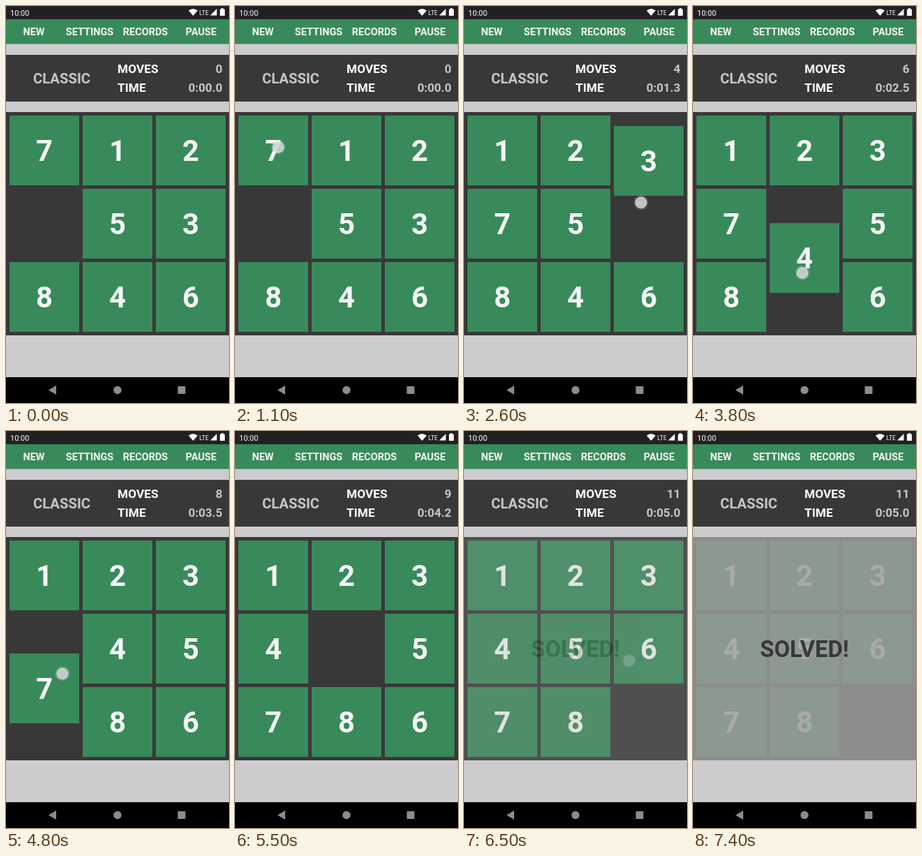
An HTML page that plays this animation: 320 px wide and 569 px high, repeating every 7.5 s.

```html
<!DOCTYPE html>
<html lang="en">
<head>
<meta charset="utf-8">
<title>Sliding puzzle</title>
<style>
  html, body { margin: 0; width: 100%; height: 100%; overflow: hidden; background: #cecbce; }
  svg { display: block; width: 100vw; height: 100vh; font-family: Roboto, sans-serif; font-weight: 700; }
  .mid { text-anchor: middle; }
  .end { text-anchor: end; }
  .menu { font-size: 14.5px; fill: #f4f6f4; }
  .label { font-size: 17.3px; fill: #fff; }
  .value { font-size: 17px; fill: #c8c6c8; }
  .tile rect { fill: #388a5b; }
  .tile text { font-size: 42px; fill: #f5f6f5; }
</style>
</head>
<body>
<svg viewBox="0 0 320 569">
  <defs>
    <radialGradient id="glow">
      <stop offset="0" stop-color="#d8d8d8" stop-opacity=".88"/>
      <stop offset=".58" stop-color="#d2d2d2" stop-opacity=".88"/>
      <stop offset=".68" stop-color="#eee" stop-opacity=".9"/>
      <stop offset=".76" stop-color="#ddd" stop-opacity=".4"/>
      <stop offset="1" stop-color="#ccc" stop-opacity="0"/>
    </radialGradient>
  </defs>

  <rect width="320" height="569" fill="#cecbce"/>

  <!-- status bar -->
  <rect width="320" height="19" fill="#232023"/>
  <g fill="#fff" font-weight="400">
    <text x="6" y="13.5" font-size="11">10:00</text>
    <path d="M262 6.6Q268.5 1.6 275 6.6L268.5 14Z"/>
    <text x="277.5" y="13" font-size="8.4">LTE</text>
    <path d="M293 13.5H302.5V4Z"/>
    <path d="M307 4.5H309V3H312V4.5H314V14H307Z"/>
  </g>

  <!-- menu -->
  <rect y="19" width="320" height="35.5" fill="#388a5b"/>
  <g class="menu mid">
    <text x="40" y="42">NEW</text>
    <text x="120" y="42">SETTINGS</text>
    <text x="200" y="42">RECORDS</text>
    <text x="280" y="42">PAUSE</text>
  </g>

  <!-- score panel -->
  <rect y="70" width="320" height="67" fill="#393839"/>
  <text class="mid" x="80" y="111" font-size="20.3" fill="#c8c6c8">CLASSIC</text>
  <text class="label" x="160" y="96">MOVES</text>
  <text class="label" x="160" y="123">TIME</text>
  <text class="value end" id="moves" x="310.5" y="96">0</text>
  <text class="value end" id="time" x="310.5" y="123">0:00.0</text>

  <!-- board -->
  <rect y="152" width="320" height="320" fill="#393839"/>
  <g id="tiles"></g>
  <g id="solved" opacity="0">
    <rect y="152" width="320" height="320" fill="#9d9d9b" fill-opacity=".84"/>
    <text class="mid" x="160" y="324" font-size="32.8" fill="#393739">SOLVED!</text>
  </g>
  <circle id="dot" r="11" fill="url(#glow)"/>

  <!-- navigation bar -->
  <rect y="532" width="320" height="37" fill="#000"/>
  <g fill="#8c8c8c">
    <path d="M61 550.5L72 544V557Z"/>
    <circle cx="160" cy="550.5" r="5.7"/>
    <rect x="246.5" y="545" width="11" height="11" rx="1"/>
  </g>
</svg>
<script>
  const LOOP = 7500, STEP = 105, SLIDE = 150, SWIPE_SPEED = 0.25, CLOCK_RATE = 0.98;
  const START = [7, 1, 2, 0, 5, 3, 8, 4, 6];
  const DIRS = { L: [-1, 0], R: [1, 0], U: [0, -1], D: [0, 1] };
  // start time, tile, direction, finger position when the tile is released
  const MOVES = [
    [1180, 7, 'D', 62, 222], [1677, 1, 'L', 175, 212], [2085, 2, 'L', 270, 214],
    [2488, 3, 'U', 254, 310], [3210, 5, 'R', 165, 314], [3723, 4, 'U', 157, 402],
    [4222, 8, 'R', 66, 412], [4722, 7, 'D', 81, 328], [5220, 4, 'L', 150, 314],
    [5740, 5, 'L', 252, 316], [6320, 6, 'U', 237, 364]
  ];
  const FIRST = MOVES[0][0], LAST = MOVES[MOVES.length - 1][0];

  const $ = id => document.getElementById(id);
  const clamp = v => Math.min(1, Math.max(0, v));
  const ease = p => (1 - Math.cos(Math.PI * p)) / 2;

  const tiles = {};
  START.forEach((n, i) => {
    if (!n) return;
    $('tiles').insertAdjacentHTML('beforeend',
      `<g class="tile"><rect width="100" height="100"/><text class="mid" x="50" y="65">${n}</text></g>`);
    tiles[n] = { el: $('tiles').lastElementChild, x: 5 + i % 3 * STEP, y: 157 + Math.floor(i / 3) * STEP };
  });

  function clock(t) {
    const tenths = Math.floor(Math.max(0, Math.min(t, LAST) - FIRST) * CLOCK_RATE / 100);
    return `0:${String(Math.floor(tenths / 10)).padStart(2, '0')}.${tenths % 10}`;
  }

  function draw(t) {
    const shift = {};
    let count = 0, touch = 0;
    for (const [at, n, dir, fx, fy] of MOVES) {
      const [dx, dy] = DIRS[dir], age = t - at;
      if (age >= 0) count++;
      const d = STEP * ease(clamp(age / SLIDE));
      const s = shift[n] || (shift[n] = [0, 0]);
      s[0] += dx * d;
      s[1] += dy * d;
      if (age > -110 && age < 200) {
        touch = clamp((200 - age) / 60);
        const run = Math.min(age, 140) * SWIPE_SPEED;
        $('dot').setAttribute('cx', fx + dx * run);
        $('dot').setAttribute('cy', fy + dy * run);
      }
    }
    for (const n in tiles) {
      const { el, x, y } = tiles[n], [sx, sy] = shift[n];
      el.setAttribute('transform', `translate(${x + sx} ${y + sy})`);
    }
    $('dot').setAttribute('opacity', touch);
    $('moves').textContent = count;
    $('time').textContent = clock(t);
    $('solved').setAttribute('opacity', clamp((t - LAST - 40) / 520));
  }

  const origin = performance.now();
  function tick() {
    draw((performance.now() - origin) % LOOP);
    requestAnimationFrame(tick);
  }
  tick();
</script>
</body>
</html>
```
